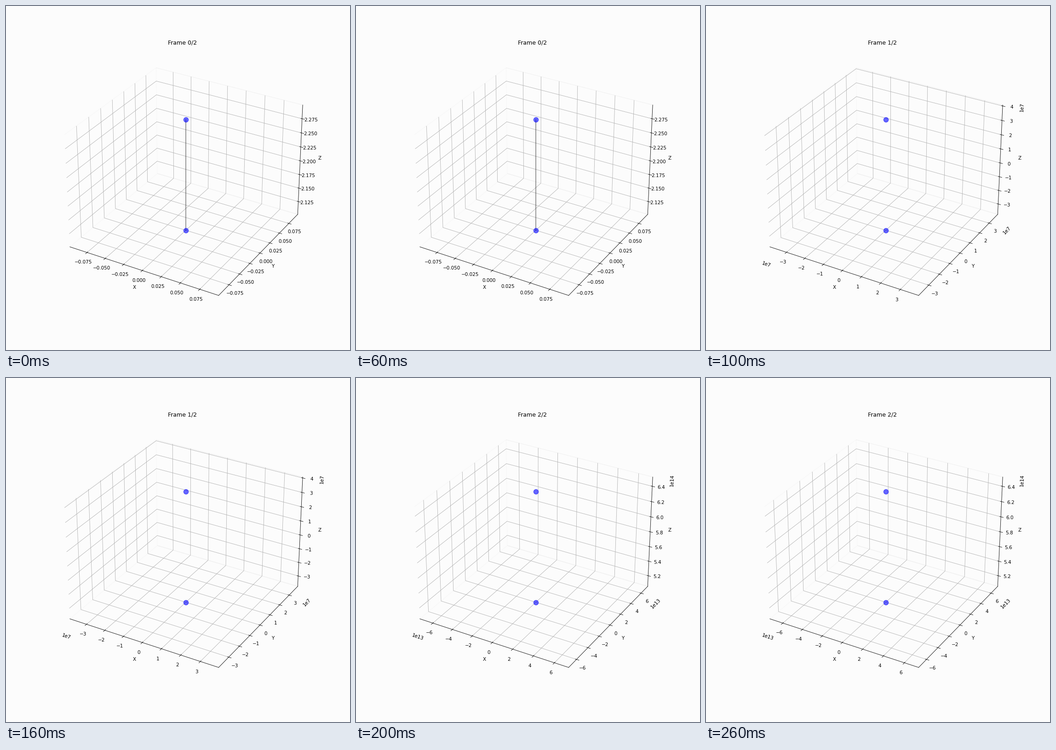
Recreate the animation shown at these times as a matplotlib script. Size 748 by 748 pixels, loop 0.3 s.

```python
import matplotlib.pyplot as plt
from matplotlib.animation import FuncAnimation

BG = "#fcfcfc"

# (lowest z, height, linked): two nodes drifting apart until the link breaks
STATES = [
    (2.101, 0.198, True),
    (-3.771e7, 7.841e7, False),
    (5.052e14, 1.4685e14, False),
]

fig = plt.figure(figsize=(10, 10), dpi=74.8, facecolor=BG)
ax = fig.add_subplot(projection="3d", facecolor=BG)


def draw(i):
    low, span, linked = STATES[i]
    high = low + span

    ax.clear()
    for axis in (ax.xaxis, ax.yaxis, ax.zaxis):
        axis.pane.fill = False

    for z in (low, high):
        ax.scatter([0], [0], [z], c="blue", s=100, alpha=0.6)
    if linked:
        ax.plot([0, 0], [0, 0], [low, high], color="black", alpha=0.5, lw=1.5)

    ax.set_xlim(-span / 2, span / 2)
    ax.set_ylim(-span / 2, span / 2)
    ax.set_zlim(low, high)
    ax.set_xlabel("X")
    ax.set_ylabel("Y")
    ax.set_zlabel("Z")
    ax.set_title(f"Frame {i}/{len(STATES) - 1}")
    return []


anim = FuncAnimation(fig, draw, frames=len(STATES), interval=100,
                     repeat=True, repeat_delay=0, blit=False)
plt.show()
```
